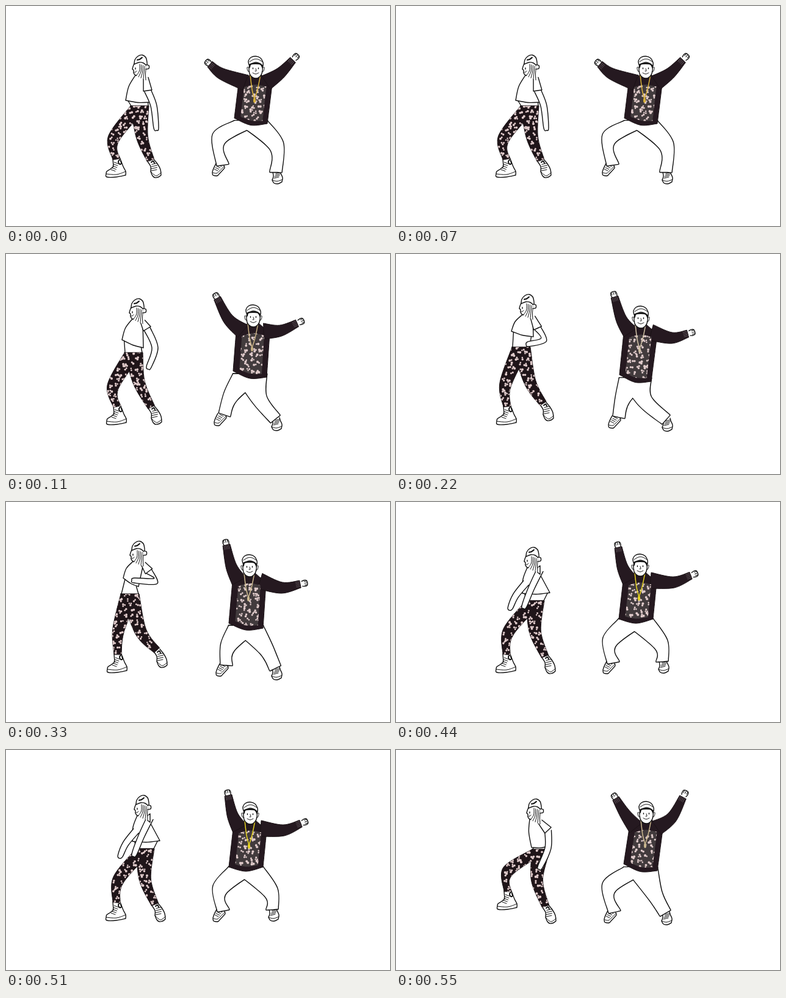
Animation of 629x359 px, one loop 0.66 s. Source, as an HTML page:

```html
<!DOCTYPE html>
<html lang="en">
<head>
<meta charset="utf-8">
<title>Two dancers</title>
<style>
  html, body { margin: 0; width: 100%; height: 100%; overflow: hidden; background: #fff; }
  svg { display: block; width: 100%; height: 100%; }
  .pose { visibility: hidden; animation: show 660ms step-end infinite; animation-delay: calc((var(--i) - 6) * 110ms); }
  @keyframes show { 0% { visibility: visible; } 16.667%, 100% { visibility: hidden; } }
  path, ellipse { fill: none; stroke: #111; stroke-width: 1.4; stroke-linecap: round; stroke-linejoin: round; }
  .white { fill: #fff; }
  .edge { stroke-width: 2.8; }
  .fill { fill: #fff; stroke: none; }
  .leggings { fill: #1f1519; stroke: #1a1215; stroke-width: 1; }
  .sweater { fill: #251920; stroke: #1a1215; stroke-width: 1; }
  .panel { fill: #423b3d; stroke: none; }
  .petal { fill: #dfcaca; stroke: none; }
  .thin { stroke-width: 1; }
  .bold { stroke-width: 2; }
  .rib { stroke: #655c60; stroke-width: 7; stroke-linecap: butt; stroke-dasharray: .8 1.7; }
  .chain { stroke: var(--gold); stroke-width: 1.5; }
  .tag { fill: var(--gold); stroke: none; }
</style>
</head>
<body>
<svg id="stage" viewBox="0 0 629 359" preserveAspectRatio="none"></svg>
<script>
const points = text => text.trim().split(/\s+/).map(s => s.split(',').map(Number));
const add = (a, x, y) => [a[0] + x, a[1] + y];
const mix = (a, b, t) => [a[0] + (b[0] - a[0]) * t, a[1] + (b[1] - a[1]) * t];
function heading(a, b) {
  const x = b[0] - a[0], y = b[1] - a[1], n = Math.hypot(x, y) || 1;
  return [x / n, y / n];
}

// Smooth runs of points, joined at corners.
function spline(runs) {
  let d = '', last = null;
  for (const run of runs) {
    const p = last ? [last, ...run] : run;
    if (!last) d = 'M' + p[0];
    for (let i = 0; i < p.length - 1; i++) {
      const a = p[i - 1] || p[i], b = p[i], c = p[i + 1], e = p[i + 2] || c;
      d += `C${add(b, (c[0] - a[0]) / 6, (c[1] - a[1]) / 6)} ${add(c, (b[0] - e[0]) / 6, (b[1] - e[1]) / 6)} ${c}`;
    }
    last = p[p.length - 1];
  }
  return d;
}
const curve = text => spline(text.split('/').map(points));
const path = (d, cls = '') => `<path class="${cls}" d="${d}"/>`;
const line = (text, cls) => path(curve(text), cls);
const poly = (list, cls) => path(spline(list.map(p => [p])), cls);
const at = ([x, y], body, turn = 0) => `<g transform="translate(${x} ${y}) rotate(${turn})">${body}</g>`;
const repeat = (n, draw) => Array.from({ length: n }, (_, k) => draw(k)).join('');

// Tapered tube around a chain of joints; w holds half widths.
function limb(joints, w, { round = false, upright = false } = {}) {
  const dirs = joints.map((p, i) =>
    upright && !i ? [0, 1] : heading(joints[i - 1] || p, joints[i + 1] || p));
  const side = s => joints.map((p, i) => add(p, -s * w[i] * dirs[i][1], s * w[i] * dirs[i][0]));
  const left = side(1), right = side(-1).reverse(), n = joints.length - 1;
  const tip = add(joints[n], dirs[n][0] * w[n], dirs[n][1] * w[n]);
  return spline(round ? [[...left, tip, ...right]] : [left, [right[0]], right.slice(1), [left[0]]]);
}

function random(seed) {
  return () => (seed = (seed * 16807) % 2147483647) / 2147483647;
}

let clips = 0;
// Small uneven flowers scattered over a box and clipped to a shape.
function flowers(shape, [x0, y0], w, h, seed) {
  const id = 'clip' + clips++, rnd = random(seed), step = 10;
  let d = '';
  for (let y = 0, row = 0; y < h; y += step * .85, row++) {
    for (let x = (row % 2) * step / 2; x < w; x += step) {
      const cx = x0 + x + rnd() * 6 - 3, cy = y0 + y + rnd() * 5 - 2.5, turn = rnd() * 6.28;
      for (let k = 2 + Math.round(rnd()); k--;) {
        const a = turn + k * 1.9, r = 1.2 + rnd() * .9;
        d += `M${cx + 1.9 * Math.cos(a) - r} ${cy + 1.9 * Math.sin(a)}a${r} ${r} 0 1 0 ${2 * r} 0a${r} ${r} 0 1 0 ${-2 * r} 0`;
      }
    }
  }
  return `<clipPath id="${id}"><path d="${shape}"/></clipPath><g clip-path="url(#${id})">${path(d, 'petal')}</g>`;
}

// Every shoe hangs from the ankle at 0,0.
function shoe(outline, sole, [x, y], [sx, sy], [lx, ly], n) {
  return line(outline, 'white') + line(sole, 'thin') +
    repeat(n, k => path(`M${x + sx * k} ${y + sy * k}l${lx} ${ly}`, 'thin'));
}
const bootL = shoe('-6,-1 -5,12 / -10,16 -16,20 -17,24 / -16,29 0,29 15,26 / 15,20 11,12 6,-1',
  '-17,24 0,25 15,20', [-9, 17], [1.3, -3], [7, 2.5], 5) + line('5,1 3,4 5,8 8,7 7,3', 'bold');
const bootR = shoe('-5,2 0,10 0,18 / 3,25 7,28 13,27 17,24 / 16,15 12,7 5,-2',
  '0,18 5,23 10,25 17,20', [1, 17], [.3, -3.5], [9, -2], 4) + line('1,3 4,1 6,4', 'bold');
const sneakerL = shoe('-11,-2 -15,6 -17,12 / -16,17 -9,18 -5,14 / 3,5 1,0',
  '-16,13 -10,14 -5,10 2,3', [-14, 7], [2, -2.4], [6, 3], 4);
const sneakerR = shoe('-5,0 -4,7 -6,13 / -3,18 4,19 10,16 / 11,9 8,2 7,-2',
  '-6,13 2,15 11,12', [-3, 10], [1, -2.5], [8, -2], 4);

const herHead =
  line('-10,-6 -12,-1 -13,3 / -11,5 -11,9 -8,13 / 9,21 / 10,-1', 'fill') +
  line('-10,-6 -12,-1 -13,3 / -11,5 -11,9 -8,13 -6,13', '') +
  repeat(5, k => path(spline([[[-1 + 2.7 * k, -5 + k], [-1.5 + 2.5 * k, 6 + k], [-7 + 4 * k, 14 + 1.7 * k]]]), 'thin')) +
  line('-10,-5 -9,-12 -4,-18 3,-20 9,-16 11,-8 11,-2 / 5,-7 -2,-8 -10,-5', 'white') +
  line('-5,-12 -1,-13 3,-16', 'bold') + line('10,-4 14,-3 14,2 9,3', 'white') +
  line('-8,1 -8,3', '') + line('-10,8 -8,8 -6,6', 'thin');

const hisHead =
  line('-10,-6 -11,6 -8,14 0,18 7,15 11,7 11,-5', 'white') +
  [-1, 1].map(s => `<g transform="scale(${s} 1)">${line('11,1 14,0 13,6 10,7', 'thin')}${line('4.5,1 4.5,2.5', '')}</g>`).join('') +
  line('-10,0 -8,-5 0,-6 8,-5 11,0', 'bold') +
  line('-11,-4 -12,-10 -8,-16 0,-18 8,-15 12,-8 12,-2 / 7,-6 0,-8 -7,-6 -11,-4', 'white') +
  line('-10,-9 -3,-13 4,-13 11,-9', 'thin') +
  line('0,2 1,6 -1,6', 'thin') + line('-5,9 0,11 5,9', 'thin');

const fist = line('-4,4 -5,0 -4,-4 0,-5 4,-4 5,0 4,4', 'white') +
  repeat(3, k => path(`M${3 * k - 3} -4v4`, 'thin'));

// Key joints. Arms run shoulder to hand, legs knee to ankle.
const her = [
  { head: '220,100', hem: '196,154 236,157', waist: '219,163', arms: ['232,138 242,163 246,199'],
    legs: ['176,217 181,250', '223,214 237,252'] },
  { head: '215,93', hem: '190,140 225,153', waist: '209,161', arms: ['231,122 244,153 234,184'],
    legs: ['175,217 182,249', '218,210 238,250'] },
  { head: '215,86', hem: '189,126 225,135', waist: '205,152', arms: ['232,121 242,140 217,147'],
    legs: ['179,214 182,249', '220,210 241,244'] },
  { head: '216,84', hem: '192,124 217,138', waist: '203,150', arms: ['234,113 245,129 210,128'],
    legs: ['184,210 183,249', '221,212 247,242'] },
  { head: '223,94', hem: '207,149 252,148', waist: '228,161', arms: ['236,111 222,140 210,170', '213,132 196,153 187,173'],
    legs: ['184,212 181,249', '228,212 244,252'] },
  { head: '227,100', hem: '222,159 254,156', waist: '238,162', arms: ['249,131 249,160 236,191'],
    legs: ['183,198 183,231', '231,212 245,255'] }
];

const his = [
  { head: '409,100', hem: '374,183 428,192', arms: ['352,110 334,95', '450,109 470,88'],
    legs: ['349,216 355,259', '443,228 442,271'], gold: '#d8b23a' },
  { head: '405,101', hem: '372,191 427,201', arms: ['364,106 346,72', '450,125 477,113'],
    legs: ['368,232 358,262', '416,238 441,269'], gold: '#c7b184' },
  { head: '401,103', hem: '366,197 418,208', arms: ['369,106 358,70', '452,137 478,130'],
    legs: ['371,237 365,266', '408,240 442,270'], gold: '#cfc0a5' },
  { head: '399,104', hem: '365,198 421,206', arms: ['369,105 361,70', '452,140 482,134'],
    legs: ['363,237 361,266', '426,240 441,271'], gold: '#cfbc92' },
  { head: '400,103', hem: '365,191 421,191', arms: ['371,106 364,74', '455,131 483,120'],
    legs: ['350,228 356,262', '434,232 436,260'], gold: '#e6d321' },
  { head: '410,102', hem: '373,186 428,197', arms: ['375,104 360,79', '452,110 470,77'],
    legs: ['349,224 358,264', '425,238 441,266'], gold: '#c9b68d' }
];

function drawHer(pose, i) {
  const [head] = points(pose.head), [waist] = points(pose.waist), [front, back] = points(pose.hem);
  const legs = pose.legs.map(points), arms = pose.arms.map(points);
  const neck = add(head, -8, 13), shoulder = add(head, 9, 17);
  const tubes = legs.map(l => limb([waist, ...l], [15, 9.5, 6], { upright: true }));
  const belly = (from, dx) => path(spline([[add(from, dx / -4, 0), add(waist, dx, 0)]]));
  return at(legs[0][1], bootL) + at(legs[1][1], bootR) +
    tubes.map(t => path(t, 'leggings')).join('') +
    flowers(tubes.join(''), add(waist, -60, 2), 100, 95, 41 + i * 97) +
    belly(front, -14) + belly(back, 14) +
    path(spline([[neck, add(mix(neck, front, .5), -3, -2), front], [add(mix(front, back, .5), 0, 2), back], [shoulder]]), 'white') +
    arms.map(a => path(limb(a, [5.5, 5, 4], { round: true }), 'white')).join('') +
    path(limb([shoulder, arms[0][0]], [4, 7]), 'fill') +
    path(limb([shoulder, arms[0][0]], [4, 7]).replace(/C[^C]*$/, '')) +
    at(head, herHead);
}

function drawHim(pose, i) {
  const [head] = points(pose.head), hem = points(pose.hem);
  const legs = pose.legs.map(points), arms = pose.arms.map(points);
  const neck = add(head, 0, 14), middle = mix(hem[0], hem[1], .5);
  const corners = [add(neck, -28, 12), add(neck, 27, 14)];
  const half = (hem[1][0] - hem[0][0]) / 2;
  const trousers = legs.map(l => limb([middle, ...l], [half, 12, 9.5], { upright: true }));
  const sleeves = arms.map((a, k) => limb([add(neck, k ? 17 : -17, 11), ...a], [13, 9, 6]));
  const onChest = (u, v) => mix(mix(corners[0], corners[1], u), mix(hem[0], hem[1], u), v);
  const panel = spline([[onChest(.18, .1)], [onChest(.5, .02), onChest(.84, .06)], [onChest(.85, .95)], [onChest(.5, .99), onChest(.18, .93)], [onChest(.18, .1)]]);
  const drop = add(neck, -2, 38);
  const hands = arms.map(([elbow, wrist], k) => {
    const [x, y] = heading(elbow, wrist);
    return { x, y, wrist, size: k ? 7 : 4, turn: Math.atan2(x, -y) * 180 / Math.PI };
  });
  return at(legs[0][1], sneakerL) + at(legs[1][1], sneakerR) +
    trousers.map(t => path(t, 'edge')).join('') + trousers.map(t => path(t, 'fill')).join('') +
    hands.map(h => at(add(h.wrist, h.x * h.size, h.y * h.size), fist, h.turn)).join('') +
    path(spline([[add(neck, -9, -2)], [corners[0]], [hem[0]], [add(middle, 0, 7), hem[1]], [corners[1]], [add(neck, 9, -2)]]), 'sweater') +
    sleeves.map(s => path(s, 'sweater')).join('') +
    hands.map(h => at(add(h.wrist, -4 * h.x, -4 * h.y), path('M-4.5 0h9', 'rib'), h.turn)).join('') +
    path(panel, 'panel') + flowers(panel, add(neck, -45, 16), 75, 75, 613 + i * 131) +
    `<g style="--gold:${pose.gold}">` +
    path(spline([[add(neck, -9, -2), add(neck, -6, 22), drop], [add(neck, 3, 22), add(neck, 8, -2)]]), 'chain') +
    `<ellipse class="tag" cx="${drop[0]}" cy="${drop[1] + 2}" rx="2" ry="4"/></g>` +
    at(head, hisHead);
}

document.getElementById('stage').innerHTML = her.map((pose, i) =>
  `<g class="pose" style="--i:${i}">${drawHer(pose, i)}${drawHim(his[i], i)}</g>`).join('');
</script>
</body>
</html>
```
